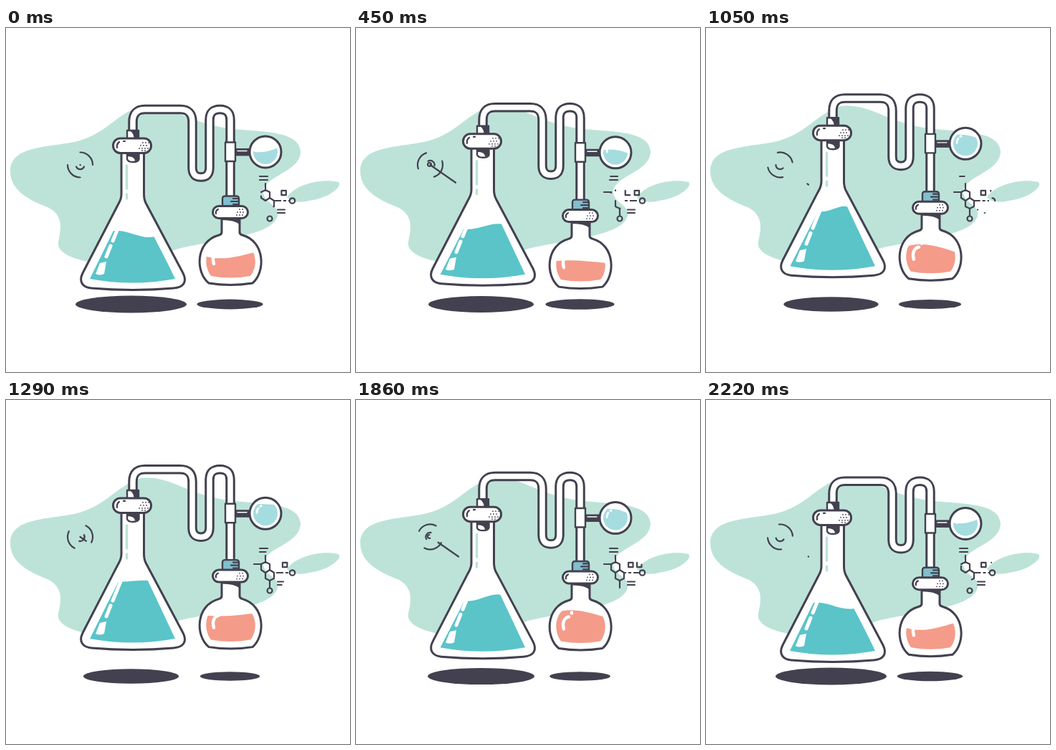
These frames come from a looping animation (480x480 px, 2250 ms). An HTML page:

```html
<!DOCTYPE html>
<html lang="en">
<head>
<meta charset="utf-8">
<title>Floating lab glassware</title>
<style>
  html, body { margin: 0; width: 100%; height: 100%; overflow: hidden; background: #fff; }
  svg { display: block; width: 100vw; height: 100vh; }
  .line { fill: none; stroke: #43414f; stroke-width: 2.2; stroke-linecap: round; stroke-linejoin: round; }
  .glass { fill: #fff; stroke: #43414f; stroke-width: 3; stroke-linejoin: round; }
  .thin { stroke-width: 2.4; }
  .dark { fill: #43414f; }
  .mint { fill: #bde3d8; }
  .shine { fill: none; stroke: #fff; stroke-linecap: round; }
  .dots { fill: none; stroke: #43414f; stroke-width: 1.8; stroke-linecap: round; stroke-dasharray: 0 4; }
</style>
</head>
<body>
<svg viewBox="0 0 480 480">
  <defs>
    <clipPath id="coneClip"><path d="M117 350Q176 361 236 350L188 248H167Z"/></clipPath>
    <clipPath id="roundClip"><path d="M286 345Q313 350 341 345C353 330 349 305 330 297H296C277 305 275 330 286 345Z"/></clipPath>
    <clipPath id="bulbClip"><circle cx="362" cy="172" r="17"/></clipPath>
    <path id="tube" d="M177 166V131Q177 113.5 194 113.5H243Q260 113.5 260 131V195Q260 208 272 208Q284 208 284 195V128Q284 113.5 298.5 113.5Q313 113.5 313 128V250"/>
  </defs>

  <path class="mint" d="M6 200C6 165 55 167 95 159C140 149 150 122 188 109C225 105 245 126 290 136C330 148 408 136 411 172C411 202 358 206 359 230C361 245 381 246 379 262C372 290 300 294 240 308C215 318 190 326 120 327C90 322 70 312 73 298C77 280 80 262 60 251C35 241 6 228 6 200Z"/>
  <path class="mint" d="M392 236C404 218 440 209 464 215C470 221 452 236 428 240C412 244 398 244 392 236Z"/>
  <ellipse id="coneShadow" class="dark" cx="174.5" cy="385.5"/>
  <ellipse id="roundShadow" class="dark" cx="312.5" cy="385.5"/>

  <g id="pipe" fill="none">
    <use href="#tube" stroke="#43414f" stroke-width="13.5"/>
    <use href="#tube" stroke="#fff" stroke-width="7.5"/>
  </g>

  <g id="bulb">
    <path class="dark" d="M319 167H342V177.5H319Z"/>
    <path class="shine" stroke-width="1.4" d="M323 170.5H336"/>
    <rect class="glass thin" x="306" y="158.5" width="14" height="26.500"/>
    <circle class="glass" cx="362" cy="172" r="22"/>
    <path id="bulbLiquid" fill="#a5dce0" clip-path="url(#bulbClip)"/>
    <path class="shine" stroke-width="3" d="M350 171Q350 167 352 165M355 162L356 161.5"/>
  </g>

  <g id="cone">
    <path class="glass" d="M161 172V232C161 240 158 243 155 249L107 342C101 354 107 362 119 363Q177 368 234 363C248 362 253 354 247 342L196 246C193 241 192.5 238 192.5 232V172Z"/>
    <path fill="none" stroke="#bde3d8" stroke-width="3.5" stroke-linecap="round" d="M168.500 192V224M168.500 232V238"/>
    <path id="coneLiquid" fill="#5ac4c9" clip-path="url(#coneClip)"/>
    <path class="shine" stroke-width="5" d="M160 270L149 297M146 304L140 319"/>
    <path fill="#fff" d="M131 328L140 326L137 343Q130 346 125 343Z"/>
    <path class="glass thin" d="M169 172V183Q170 187 177 187Q185 187 185.500 183V172Z"/>
    <path class="dark" d="M169 174H186V184L180 186Q180 179 169 179Z"/>
    <rect class="glass thin" x="169" y="143" width="16" height="14"/>
    <path class="dark" d="M173 143Q180 149 178 156H186V143Z"/>
    <rect class="glass" x="149.5" y="154" width="53" height="20.5" rx="10"/>
    <path class="line" d="M155 167Q154 162 158 159M164 158H166"/>
    <path class="dots" d="M191 160H200M188 164H200M186 168H199M190 171H196"/>
  </g>

  <g id="round">
    <path class="glass" d="M301 262V284Q301 287 297 288C264 297 264 340 283 355Q313 360 344 355C362 340 362 297 330 288Q326 287 326 284V262Z"/>
    <path class="dark" d="M302 264H326V273Q319 267 302 267Z"/>
    <path id="roundLiquid" fill="#f59b8a" clip-path="url(#roundClip)"/>
    <path class="shine" stroke-width="4.5" d="M290 328C287 319 291 312 297 311M301 305V306"/>
    <path class="thin" d="M302 249V237Q302 233.5 306 233.5H321Q325 233.5 325 237V249Z" fill="#80bfcd" stroke="#43414f"/>
    <path class="line" d="M317 237H324M314 241H324M317 245H324"/>
    <rect class="glass" x="288.5" y="247.5" width="49" height="17" rx="8.5"/>
    <path class="line" d="M293 258Q292 254 296 252"/>
    <path class="dots" d="M326 252H334M323 256H335M322 260H332"/>
  </g>

  <g class="line">
    <path id="outer" d="M103.5 173.5A17.5 17.5 0 0 1 121 191M103.5 208.5A17.5 17.5 0 0 1 86 191"/>
    <path id="inner" d="M109 193.5A6 6 0 0 1 98 193.5"/>
    <path id="hand" pathLength="100" d="M103.5 191L143 218.5"/>
  </g>
  <g class="line" id="molecule">
    <path id="dashes" stroke-dasharray="10 3 4 3" style="stroke-linecap: butt" d="M374 241H395"/>
  </g>
</svg>
<script>
const LOOP = 2250, STEP = 30;
const $ = id => document.getElementById(id);
const clamp = v => Math.min(1, Math.max(0, v));
const ease = v => (v = clamp(v), v * v * (3 - 2 * v));
const wrap = (v, n) => ((v % n) + n) % n;
const wave = (t, period, lag = 0) => Math.cos(2 * Math.PI * (t - lag) / period);
const lift = (t, lag) => (1 - wave(t, LOOP, lag)) / 2;
const shift = (id, y) => $(id).setAttribute('transform', `translate(0 ${y})`);
const spin = (id, angle) => $(id).setAttribute('transform', `rotate(${angle} 103.5 191)`);
const circle = (x, y, r) => `M${x} ${y - r}a${r} ${r} 0 1 1 0 ${2 * r}a${r} ${r} 0 1 1 0 ${-2 * r}`;

function stroke(d) {
  const path = document.createElementNS('http://www.w3.org/2000/svg', 'path');
  path.setAttribute('d', d);
  path.setAttribute('pathLength', 100);
  $('molecule').append(path);
  return path;
}

// Show only the part of a path between two fractions of its length.
function trim(path, from, to) {
  path.style.display = to > from ? '' : 'none';
  path.style.strokeDasharray = from <= 0 && to >= 1 ? 'none' : `${(to - from) * 100} 300`;
  path.style.strokeDashoffset = -from * 100;
}

// Path, erase start, erase end, redraw start, redraw end.
const bonds = [
  ['M354 207H365', 350, 850, 850, 1200],
  ['M354 212H365', 450, 1050, 1050, 1400],
  ['M362 217V227', 150, 500, 500, 750],
  ['M346 229H356', 1900, 2200, 2350, 2650],
  ['M356 229V237L362 241L368 237V229L362 226Z', 2150, 2600, 2670, 3000],
  ['M362 241V249L368 252L374 249V241L368 237', 1950, 2500, 2500, 2950],
  ['M368 252V262', 1900, 2200, 2450, 2690],
  [circle(368, 266, 3.5), 1560, 1800, 1900, 2180],
  [circle(399.5, 241, 3.7), 500, 760, 900, 1350],
  ['M379 253.5H389', 600, 1020, 1020, 1400],
  ['M379 258H389', 600, 1100, 1100, 1450],
].map(([d, ...times]) => ({ path: stroke(d), times }));

const squares = [0, LOOP / 2].map(delay => ({ path: stroke('M-3.2 -3.2V3.2H3.2V-3.2Z'), delay }));
const ring = stroke(circle(102.5, 190.5, 2.5));

// Wavy surface from x0 to x1; the clip path gives the rest of the shape.
function liquid(id, x0, x1, y, tilt, bend0, bend1) {
  const w = x1 - x0;
  $(id).setAttribute('d', `M${x0} ${y - tilt}C${x0 + w * .35} ${y + bend0 * tilt} ${x0 + w * .65} ${y + bend1 * tilt} ${x1} ${y + tilt}L${x1 + 60} ${y + 120}H${x0 - 60}Z`);
}

function shadow(id, rx, ry) {
  $(id).setAttribute('rx', rx);
  $(id).setAttribute('ry', ry);
}

function drawDial(t) {
  const u = t % (LOOP / 2), turn = u / (LOOP / 2);
  spin('outer', 180 * turn);
  spin('inner', -360 * turn);
  trim(ring, ease((u - 550) / 400), ease((u - 250) / 200));
  const from = ease((u - 525) / 600);
  trim($('hand'), from, Math.max(from + .005, ease(u / 560)));
}

function drawMolecule(t) {
  for (const { path, times: [out, gone, back, full] } of bonds) {
    const u = out + wrap(t - out, LOOP);
    if (u < back) trim(path, ease((u - out) / (gone - out)), 1);
    else trim(path, 0, ease((u - back) / (full - back)));
  }
  for (const { path, delay } of squares) {
    const age = wrap(t + delay - 300, LOOP), pos = age / 975 - 1;
    path.setAttribute('transform', `translate(${389 + 9 * pos + 4 * pos ** 3} 230)`);
    trim(path, 0, Math.min(ease(age / 300), 1 - ease((age - 1300) / 640)));
  }
  $('dashes').setAttribute('stroke-dashoffset', -20 * t / (LOOP / 2));
}

function draw(now) {
  const t = Math.floor((now % LOOP) / STEP) * STEP;
  const coneLift = lift(t, 0), roundLift = lift(t, 400);
  const slosh = lag => wave(t, LOOP / 3, lag);

  shift('cone', -18 * coneLift);
  shift('pipe', .6 - 17.5 * lift(t, 125));
  shift('bulb', 3 - 17 * lift(t, 255));
  shift('round', 6.2 - 18.5 * roundLift);
  shadow('coneShadow', 77.5 - 11.5 * coneLift, 12 - 1.8 * coneLift);
  shadow('roundShadow', 48.2 - 7.2 * roundLift, 7.2 - 1.1 * roundLift);

  const level = 287.5 - 18 * lift(t, 80);
  liquid('coneLiquid', 118 + (349 - level) * .49, 235 - (348 - level) * .47, level, 4 * slosh(0), -2, 2);
  liquid('roundLiquid', 279, 347, 313.5 + 7 * wave(t, LOOP, 500), -3.7 * slosh(-70), -3, -1);
  liquid('bulbLiquid', 345, 379, 165 + 6 * wave(t, LOOP, 320), -2.5 * slosh(0), -2, -1);

  drawDial(t);
  drawMolecule(t);
  requestAnimationFrame(() => draw(performance.now()));
}
draw(0);
</script>
</body>
</html>
```
